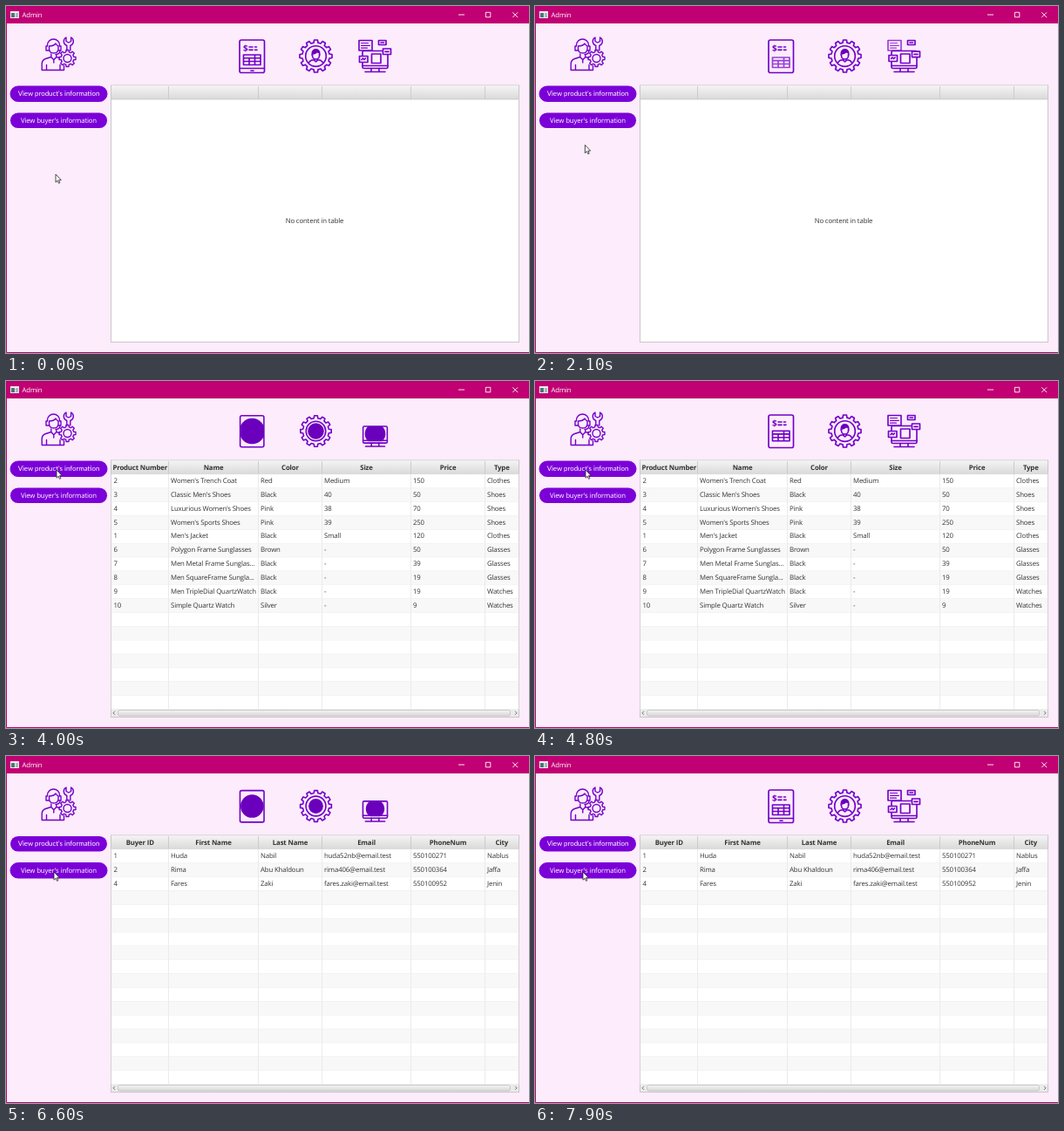
An HTML page that plays this animation: 600 px wide and 398 px high, repeating every 8 s.

```html
<!DOCTYPE html>
<html lang="en">
<head>
<meta charset="utf-8">
<title>Admin</title>
<style>
html, body { margin: 0; height: 100%; overflow: hidden; background: #fdecfb; }
svg { display: block; width: 600px; height: 398px; font: 7.8px "Open Sans", "Noto Sans", sans-serif; letter-spacing: -.15px; text-rendering: geometricPrecision; }
.mid { text-anchor: middle; }
.icon { fill: none; stroke: #7200ca; stroke-width: 1.65; stroke-linejoin: round; stroke-linecap: round; }
.icon .bg { fill: #fdecfb; }
.icon .solid { fill: #6b00bc; stroke: none; }
.btn rect { fill: #7b00d8; }
.btn text { fill: #fff; }
</style>
</head>
<body>
<svg viewBox="0 0 600 398">
  <defs>
    <linearGradient id="head" x2="0" y2="1"><stop stop-color="#f4f4f4"/><stop offset="1" stop-color="#d9d9d9"/></linearGradient>
    <radialGradient id="glow"><stop stop-color="#ff9aa8"/><stop offset=".4" stop-color="#f5566c"/><stop offset="1" stop-color="#e92f50"/></radialGradient>
    <clipPath id="tabletClip"><rect x="268.5" y="39" width="28" height="37"/></clipPath>
    <clipPath id="screenClip"><rect x="409" y="51.5" width="29" height="18"/></clipPath>
  </defs>
  <rect width="600" height="398" fill="#fdecfb"/>
  <path d="M.5 20V397.500H600" fill="none" stroke="#c00073"/>
  <rect width="600" height="20" fill="#c00073"/>
  <rect x="5" y="6" width="10" height="8" fill="#e8ecec"/>
  <path d="M6 8h4v5h-4z" fill="#4c7777"/><path d="M11 8h3v5h-3z" fill="#a9b6b8"/>
  <text x="18.5" y="13" fill="#fff">Admin</text>
  <path d="M519 10h7M550.300 7.300h5.500v5.500h-5.500zM581.300 7.300l5.800 5.800M587.100 7.300l-5.800 5.800" fill="none" stroke="#fff" stroke-width=".9"/>

  <g class="icon" style="stroke-width:1.4">
    <path d="M47.500 46v-1a7 7 0 0 1 14 0v1M49.500 46c3.500 0 6-1 7.500-3 1 1.600 2 2.600 3 3v3.500a5.300 5.300 0 0 1-10.500 0zM47.500 46h-1.500v5H49M61.500 46h1.500v5H60M62 51c0 3-2 4.500-5 4.500"/>
    <path d="M51.800 55v3.500l3 3.200 3-3.200V56M51.800 58.500l-6.300 2c-3 1-4.300 3-4.300 6V73.500H66.500v-5M57.800 58.500l3.700 1.200M46.500 67.500v6M62 67.500v6M54.800 62v3"/>
    <path d="M69.800 51v-5.500a5.200 5.200 0 0 1-.8-9.500v4.500l2.800 1.500 2.800-1.500V36a5.200 5.200 0 0 1-.8 9.500V51"/>
    <path id="cog"/><circle cx="70.500" cy="60" r="4.500"/>
  </g>

  <g class="icon" id="tablet">
    <rect x="268" y="39" width="28.500" height="37.500" rx="2"/>
    <circle class="solid" id="tabletDot" cx="282.300" cy="57.500" clip-path="url(#tabletClip)"/>
    <g id="bill">
      <text x="272" y="51.500" font-size="10" font-weight="700" fill="#7200ca" stroke="none">$</text>
      <path d="M279 47h4M285.500 47h2"/>
    </g>
    <path id="sums" d="M279 50.300h4M285.500 50.300h2.500"/>
    <path id="grid" d="M272.500 56h19.500v11.500h-19.500zM272.500 59.700h19.500M272.500 63.500h19.500M279 59.700v8M285.500 56v11.500"/>
    <path id="home" d="M268.500 71.500h27.500M281 74.200h3"/>
  </g>

  <g class="icon" id="gear">
    <path id="teeth"/>
    <circle cx="355.500" cy="57.500" r="11.800"/>
    <circle class="solid" id="gearDot" cx="355.500" cy="57.500"/>
    <g id="person">
      <path class="solid" d="M350.500 57v-3a5 5 0 0 1 10 0v3l-1.500-2.500-2-1c-1.500 1.500-3 2-5 2z"/>
      <path d="M351.500 55.500v1.500a4 4 0 0 0 8 0v-1.500M347.500 65c1-2 3-3 5.500-3.200l2.500 2 2.500-2c2.500.2 4.500 1.200 5.500 3.200"/>
    </g>
  </g>

  <g class="icon" id="monitor">
    <rect x="409" y="51.500" width="29" height="20" rx="1.500"/>
    <path d="M409 68.500h29M419 71.500v3.500M428 71.500v3.500M412 75.500h23"/>
    <circle class="solid" id="screenDot" cx="423.500" cy="60.500" clip-path="url(#screenClip)"/>
    <rect id="panel" class="bg" x="419.500" y="55" width="10.500" height="10.500"/>
    <g id="note"><rect class="bg" x="405" y="39.500" width="15" height="11.500"/><path d="M407.500 42.500h8M407.500 45.300h10M407.500 48.200h7" stroke-width="1.200"/></g>
    <g id="tag"><rect class="bg" x="427.500" y="39.500" width="8.500" height="5"/><path d="M430 42h3.500"/></g>
    <g id="right"><rect class="bg" x="432.500" y="49" width="9" height="6.500"/><path d="M435 52.300h4"/></g>
    <g id="left"><rect class="bg" x="405.500" y="57.500" width="9.500" height="7"/><path d="M408 61.500l1.500-1.500 1.500 1.500 1.500-1.500"/></g>
  </g>

  <g class="btn mid">
    <rect id="btn1" x="5" y="92" width="111" height="17.500" rx="8.750"/>
    <text x="60.500" y="102.900" style="font:7.900px Lato,sans-serif;letter-spacing:0">View product's information</text>
    <rect id="btn2" x="5" y="122.500" width="111" height="17.500" rx="8.750"/>
    <text x="60.500" y="133.700">View buyer's information</text>
  </g>

  <rect x="120.500" y="91" width="468" height="294.500" fill="#fff" stroke="#c8c8c8"/>
  <rect x="121" y="91.500" width="467" height="15.500" fill="url(#head)"/>
  <path d="M121 107h467M186.500 92v15M289.500 92v15M362.500 92v15M464.500 92v15M549.500 92v15" stroke="#c6c6c6" stroke-width=".8"/>
  <text id="empty" class="mid" x="354" y="249" fill="#333">No content in table</text>
  <g id="body">
    <g id="stripes" stroke="#f1f1f1" stroke-width=".6"></g>
    <path d="M186.500 107v269M289.500 107v269M362.500 107v269M464.500 107v269M549.500 107v269" stroke="#ebebeb"/>
    <rect x="121" y="376.500" width="467" height="8.500" fill="#ebebeb"/>
    <rect x="128.500" y="377.500" width="450" height="6.500" rx="2" fill="url(#head)" stroke="#bbb" stroke-width=".7"/>
    <path d="M125 378.800l-2 2 2 2M584 378.800l2 2-2 2" fill="none" stroke="#666" stroke-width=".9"/>
  </g>
  <g id="products" fill="#333"></g>
  <g id="buyers" fill="#333"></g>
  <circle id="ring" fill="url(#glow)"/>
  <path id="cursor" d="M0 0V9.200L2.100 7.300 3.500 10.300 4.900 9.700 3.500 6.700H6.300Z" fill="#fff" stroke="#222" stroke-width=".8"/>
</svg>
<script>
const $ = id => document.getElementById(id);
const COLS = [121, 186.5, 289.5, 362.5, 464.5, 549.5, 588];
const ROW = 15.85;

const PRODUCTS = `Product Number|Name|Color|Size|Price|Type
2|Women's Trench Coat|Red|Medium|150|Clothes
3|Classic Men's Shoes|Black|40|50|Shoes
4|Luxurious Women's Shoes|Pink|38|70|Shoes
5|Women's Sports Shoes|Pink|39|250|Shoes
1|Men's Jacket|Black|Small|120|Clothes
6|Polygon Frame Sunglasses|Brown|-|50|Glasses
7|Men Metal Frame Sunglas...|Black|-|39|Glasses
8|Men SquareFrame Sungla...|Black|-|19|Glasses
9|Men TripleDial QuartzWatch|Black|-|19|Watches
10|Simple Quartz Watch|Silver|-|9|Watches`;

const BUYERS = `Buyer ID|First Name|Last Name|Email|PhoneNum|City
1|Huda|Nabil|huda52nb@email.test|550100271|Nablus
2|Rima|Abu Khaldoun|rima406@email.test|550100364|Jaffa
4|Fares|Zaki|fares.zaki@email.test|550100952|Jenin`;

function table(id, data) {
  $(id).innerHTML = data.split("\n").map((line, r) => line.split("|").map((s, c) => r
    ? `<text x="${COLS[c] + 2.5}" y="${101.2 + r * ROW}">${s}</text>`
    : `<text class="mid" font-weight="700" x="${(COLS[c] + COLS[c + 1]) / 2}" y="101.6">${s}</text>`
  ).join("")).join("");
}

function gearPath(cx, cy, r, R, n) {
  const step = 2 * Math.PI / n, pts = [];
  for (let i = 0; i < n; i++)
    for (const [k, rad] of [[-.3, r], [-.2, R], [.2, R], [.3, r]]) {
      const a = (i + k) * step;
      pts.push((cx + rad * Math.cos(a)).toFixed(2) + " " + (cy + rad * Math.sin(a)).toFixed(2));
    }
  return "M" + pts.join("L") + "Z";
}

table("products", PRODUCTS);
table("buyers", BUYERS);
$("teeth").setAttribute("d", gearPath(355.5, 57.5, 15.6, 18.6, 12));
$("cog").setAttribute("d", gearPath(70.5, 60, 7.4, 9.6, 8));
for (let i = 0; i < 17; i++)
  $("stripes").innerHTML += `<rect x="121" y="${107 + i * ROW}" width="467" height="${ROW}" fill="${i % 2 ? "#f8f8f8" : "#fff"}"/>`;

const ramp = (t, a, b) => {
  const x = Math.min(1, Math.max(0, (t - a) / (b - a)));
  return x * x * (3 - 2 * x);
};
const mix = (a, b, k) => a + (b - a) * k;
const show = (id, on) => $(id).style.opacity = +on;
const radius = (id, r) => $(id).setAttribute("r", r);
const move = (id, x, y) => $(id).setAttribute("transform", `translate(${x} ${y})`);
const scale = (id, x, y, k) =>
  $(id).setAttribute("transform", `translate(${x} ${y}) scale(${k}) translate(${-x} ${-y})`);

// Icons redraw themselves every 2550 ms; p is the time since the redraw began.
function icons(p) {
  const grow = mix(.95, 1, ramp(p, 0, 300)), dot = 1 - ramp(p, 50, 380);
  scale("tablet", 282.3, 57.7, grow);
  scale("gear", 355.5, 57.5, grow);
  scale("monitor", 423.5, 62, grow);
  radius("tabletDot", 15.5 * dot);
  radius("gearDot", 9.8 * dot);
  radius("screenDot", 12.5 * dot);
  show("bill", ramp(p, 300, 450));
  show("sums", ramp(p, 540, 680));
  show("grid", ramp(p, 560, 800));
  move("grid", 0, mix(4, 0, ramp(p, 560, 1050)));
  show("home", ramp(p, 900, 1050));
  show("person", ramp(p, 250, 450));
  for (const id of ["tag", "left", "right"]) show(id, ramp(p, 300, 420));
  const slide = 1 - ramp(p, 520, 850);
  move("left", 1.5 * slide, -3 * slide);
  move("right", 0, 9 * slide);
  show("panel", ramp(p, 540, 720));
  show("note", ramp(p, 560, 800));
}

function click(t) {
  const [x, y, age] = t < 5000 ? [58, 101, t - 2800] : [55, 132, t - 6100];
  const on = age > 0 && age < 500;
  $("ring").setAttribute("cx", x);
  $("ring").setAttribute("cy", y);
  radius("ring", on ? mix(4, 11, age / 400) : 0);
  show("ring", on ? 1 - ramp(age, 200, 480) : 0);
}

// The focused button is slightly larger.
function focus(id, on) {
  $(id).style.stroke = on ? "#7b00d8" : "none";
}

function draw(now) {
  const t = Math.floor(now % 8000 / 100) * 100;
  icons((t + 1170) % 2550);
  click(t);
  focus("btn1", t < 6100);
  focus("btn2", t >= 6100);
  const up = ramp(t, 1750, 2600), down = ramp(t, 5050, 5700);
  move("cursor", 57 + up - 3 * down, 193 - 91 * up + 31 * down);
  show("empty", t < 3100);
  show("body", t >= 3100);
  show("products", t >= 3100 && t < 6500);
  show("buyers", t >= 6500);
}

const start = performance.now();
function loop() {
  draw(performance.now() - start);
  requestAnimationFrame(loop);
}
loop();
</script>
</body>
</html>
```
